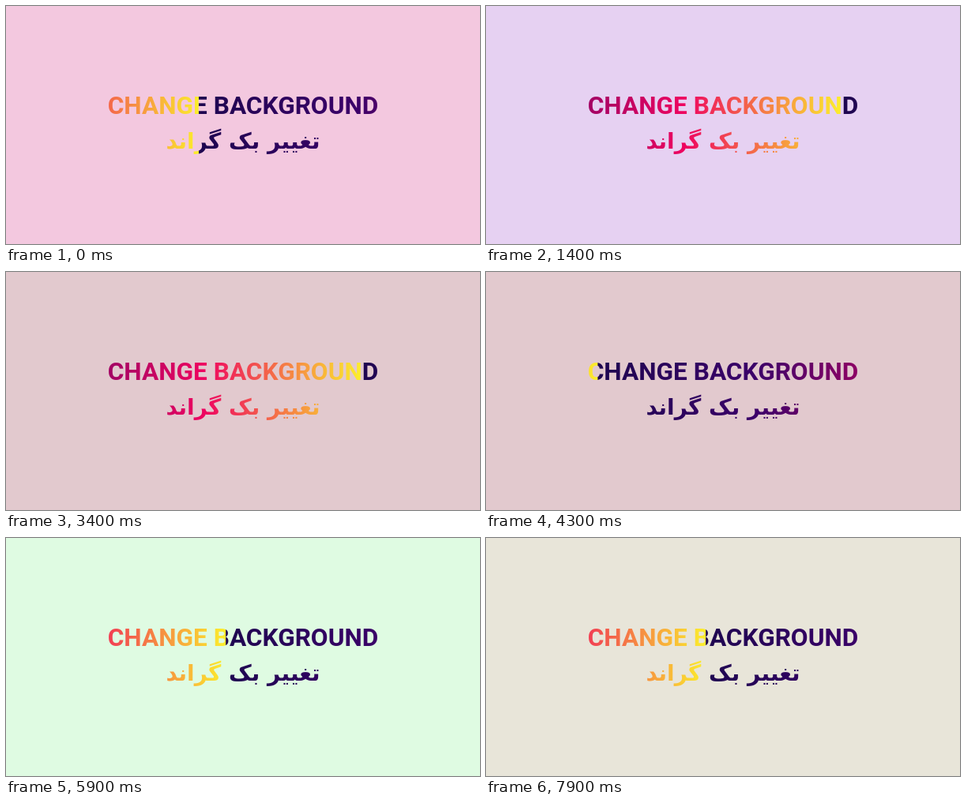
An HTML page that plays this animation: 600 by 302 pixels, repeating every 8000 ms.

```html
<!DOCTYPE html>
<html lang="en">
<head>
<meta charset="utf-8">
<style>
  html, body { margin: 0; width: 100%; height: 100%; overflow: hidden; }
  p {
    position: absolute; left: 129px; width: 342px; height: 46px; margin: 0;
    display: flex; justify-content: center;
    white-space: nowrap; font-weight: 700; line-height: 46px; color: transparent;
    background: linear-gradient(90deg, #1e0650 0%, #3b0069 29%, #ee0460 71%, #fcee2c 100%) 0 0 / 684px 100%;
    -webkit-background-clip: text; background-clip: text;
  }
  #en { top: 104px; font-size: 31.6px; font-family: Roboto, sans-serif; }
  #fa { top: 149px; font-size: 28px; font-family: "DejaVu Sans", sans-serif; }
</style>
</head>
<body>
<p id="en">CHANGE BACKGROUND</p>
<p id="fa" lang="fa" dir="rtl">تغییر بک گراند</p>
<script>
  const LOOP = 8000, STEP = 100, SWEEP = 2000, TILE = 684, START = 115;
  const tints = ['#f3c8df', '#e6d1f2', '#e2c9ce', '#dffbe2', '#e8e5d9'];
  const lines = document.querySelectorAll('p');

  function draw(now) {
    const t = Math.floor(now % LOOP / STEP) * STEP;
    // A new tint every two seconds, first at 400 ms
    document.body.style.background = tints[Math.floor((t + 1600) / 2000)];
    // The gradient slides left by one tile per sweep
    const x = START - TILE * (t % SWEEP) / SWEEP;
    for (const line of lines) line.style.backgroundPositionX = x + 'px';
    requestAnimationFrame(draw);
  }
  draw(performance.now());
</script>
</body>
</html>
```
